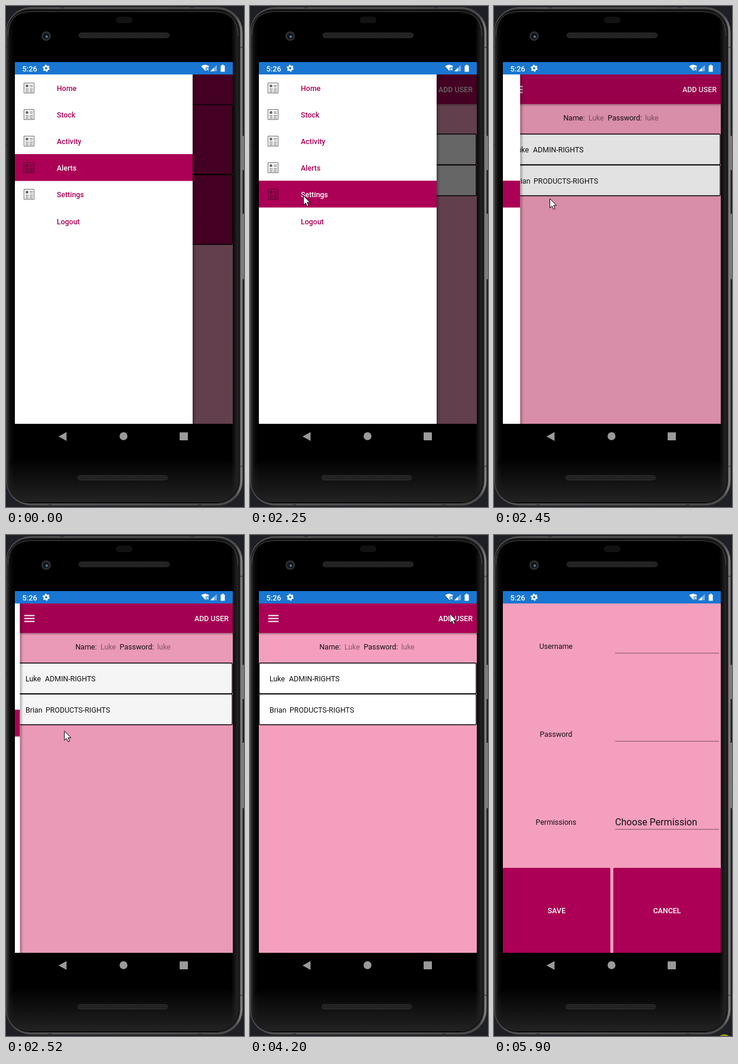
An HTML page for the animation above (5970 ms loop, 403x849 px).

```html
<!DOCTYPE html>
<html lang="en">
<head>
<meta charset="utf-8">
<title>Phone app walkthrough</title>
<style>
  html, body { margin: 0; width: 100%; height: 100%; overflow: hidden; background: #1f2026; }
  svg { display: block; }
  text { font: 12.45px Roboto, sans-serif; white-space: pre; }
  .bold { font-weight: 500; }
  .mid { text-anchor: middle; }
  .end { text-anchor: end; }
</style>
</head>
<body>
<svg id="stage" width="403" height="849" viewBox="0 0 403 849">
  <defs>
    <linearGradient id="metal">
      <stop offset="0" stop-color="#4a4a4a"/><stop offset=".2" stop-color="#555"/>
      <stop offset=".97" stop-color="#4a4a4a"/><stop offset="1" stop-color="#858585"/>
    </linearGradient>
    <linearGradient id="side">
      <stop offset="0" stop-color="#303030"/><stop offset=".012" stop-color="#0c0c0c"/>
      <stop offset=".03" stop-color="#000"/><stop offset=".97" stop-color="#000"/>
      <stop offset="1" stop-color="#262626"/>
    </linearGradient>
    <linearGradient id="foot" x2="0" y2="1">
      <stop offset="0" stop-color="#222" stop-opacity="0"/><stop offset="1" stop-color="#222"/>
    </linearGradient>
    <linearGradient id="down" x2="0" y2="1">
      <stop offset="0" stop-opacity=".3"/><stop offset="1" stop-opacity="0"/>
    </linearGradient>
    <linearGradient id="right">
      <stop offset="0" stop-opacity=".3"/><stop offset="1" stop-opacity="0"/>
    </linearGradient>
    <pattern id="mesh" width="3" height="3" patternUnits="userSpaceOnUse">
      <rect width="3" height="3" fill="#1b1b1b"/><path d="M0 2L2 0" stroke="#3c3c3c"/>
    </pattern>
    <clipPath id="view"><rect x="15" y="116" width="369" height="592"/></clipPath>
    <clipPath id="bar"><rect x="15" y="116" width="369" height="50"/></clipPath>
  </defs>

  <!-- phone body -->
  <rect width="403" height="849" fill="#1f2026"/>
  <g fill="#777">
    <rect x="399" y="220" width="4" height="58"/>
    <rect x="399" y="352" width="4" height="111"/>
  </g>
  <rect x="0" y="2" width="400.500" height="844.500" rx="42" fill="url(#metal)"/>
  <path d="M0 70h4M0 235h4M397 70h4M397 780h4M92 3h6M312 3h6M72 845h6M325 845h6" stroke="#222"/>
  <rect x="1.500" y="5" width="395" height="838" rx="39" fill="#181818"/>
  <rect x="2" y="8" width="391" height="834" rx="37" fill="url(#side)"/>
  <path d="M3 50Q4 9.500 42 9.500H352Q392 9.500 393 50" fill="none" stroke="#555"/>
  <rect x="3" y="765" width="389" height="76" rx="34" fill="url(#foot)"/>
  <rect x="186" y="18" width="28" height="11" rx="5.500" fill="#121212"/>
  <rect x="123.500" y="45.500" width="153" height="8.500" rx="4" fill="url(#mesh)" stroke="#2c2c2c"/>
  <rect x="121.500" y="795.500" width="152" height="8" rx="4" fill="url(#mesh)" stroke="#2c2c2c"/>
  <circle cx="68" cy="51" r="8" fill="#303030"/>
  <circle cx="68" cy="51" r="5.500" fill="#14181d"/>
  <circle cx="69" cy="52" r="2" fill="#4d7fa8"/>
  <rect x="15" y="95" width="369" height="613"/>
  <g fill="#9a9a9a">
    <path d="M89 729.500L102.500 722V737Z"/>
    <circle cx="199" cy="729" r="6.700"/>
    <rect x="294" y="722.500" width="14" height="13.500" rx="1"/>
  </g>

  <!-- status bar -->
  <rect x="15" y="95" width="369" height="21" fill="#1976d2"/>
  <g fill="#fff">
    <text x="27.500" y="110.500" class="bold" style="font-size:12.800px">5:26</text>
    <circle cx="68" cy="105.500" r="3.200" fill="none" stroke="#fff" stroke-width="2.600"/>
    <circle cx="68" cy="105.500" r="4.900" fill="none" stroke="#fff" stroke-width="2" stroke-dasharray="2.600 2.530"/>
    <path d="M330.500 102Q337 97 344 102L337.500 110Z"/>
    <path d="M338 104h6v6h-6z" fill="#1976d2"/>
    <path d="M339 105l4 4m0-4l-4 4" stroke="#fff" stroke-width="1.300"/>
    <path d="M346 110.500L357 100V110.500Z" opacity=".45"/>
    <path d="M346 110.500L352 104.800V110.500Z"/>
    <path d="M363.500 101h2v-1.500h3V101h2v10.500h-7z"/>
  </g>

  <g clip-path="url(#view)">
    <g id="home"></g>
    <g id="users"></g>
    <rect id="scrim" x="15" y="116" width="369" height="592"/>
    <g id="drawer"></g>
    <g id="form"></g>
  </g>
  <circle id="click" r="12" fill="#ffee00" opacity=".55"/>
  <path id="cursor" d="M.5 .5V16.200L4.200 12.800L6.700 18.500L9.200 17.400L6.800 11.900H11.600Z" fill="#fff" stroke="#000"/>
</svg>
<script>
const LOOP = 5970, WINE = "#ab0055", PINK = "#f49fbe";
const el = id => document.getElementById(id);
const rect = (x, y, w, h, fill, more = "") =>
  `<rect x="${x}" y="${y}" width="${w}" height="${h}" fill="${fill}" ${more}/>`;
const text = (x, y, s, fill = "#111", cls = "", more = "") =>
  `<text x="${x}" y="${y}" fill="${fill}" class="${cls}" ${more}>${s}</text>`;
const page = rect(15, 116, 369, 592, PINK);
const toolbar = rect(15, 116, 369, 50, WINE) + rect(15, 166, 369, 4, "url(#down)");
const edge = 'rx="2" stroke="#000" stroke-width="1.3"';

el("home").innerHTML = page + toolbar +
  [167, 286].map(y => rect(15.5, y, 368, 118, WINE, edge)).join("");

el("users").innerHTML = page + toolbar +
  [136.5, 141.5, 146.5].map(y => rect(31, y - 1, 17.5, 2, "#fff")).join("") +
  text(377, 146, "ADD USER", "#fff", "bold end") +
  '<g clip-path="url(#bar)"><circle id="ripple" cx="347" cy="141" fill="#fff"/></g>' +
  text(117.5, 193.5, "Name:") + text(160, 193.5, "Luke", "#895a6b") +
  text(192.5, 193.5, "Password:") + text(256, 193.5, "luke", "#895a6b") +
  [["Luke", 66, "ADMIN-RIGHTS"], ["Brian", 67, "PRODUCTS-RIGHTS"]].map(([name, x, rights], i) => {
    const y = 217 + i * 52.7;
    return rect(15.5, y, 367.5, 51.8, "#fff", edge) + text(33, y + 31, name) + text(x, y + 31, rights);
  }).join("");

const icon = y => `<g transform="translate(30 ${y})" fill="none" stroke="#111" opacity=".62">
  <path d="M.5 .5h17v17h-17zM10 4.500h5.500M10 7h5.500M3 10.500h5.500M10 10.500h5.500M3 13h5.500M10 13h5.500M3 15.300h5.500M10 15.300h5.500"/>
  <circle cx="5.500" cy="5.500" r="2" fill="#111"/></g>`;
const rowTop = i => Math.round(116 + i * 45.1);
const labels = ["Home", "Stock", "Activity", "Alerts", "Settings", "Logout"];
el("drawer").innerHTML = rect(316, 116, 6, 592, "url(#right)") + rect(15, 116, 301, 592, "#fff") +
  rect(15, 0, 301, 45.5, WINE, 'id="mark"') +
  labels.map((s, i) => (i < 5 ? icon(rowTop(i) + 14) : "") +
    text(86, rowTop(i) + 27.5, s, WINE, "bold", `id="item${i}"`)).join("");

el("form").innerHTML = page +
  ["Username", "Password", "Permissions"].map((s, i) => {
    const y = 192.5 + i * 149.3;
    return text(105, y, s, "#111", "mid") + rect(205, y + 7.2, 176, 1, "#7b5262");
  }).join("") +
  text(205, 492, "Choose Permission", "#111", "", 'style="font-size:16.1px"') +
  [[15, "SAVE"], [202, "CANCEL"]].map(([x, s]) =>
    rect(x, 564, 182, 146, WINE, 'rx="2"') + text(x + 91, 641, s, "#fff", "bold mid")).join("");

// pointer strokes: [ms, x, y]; the pointer is hidden outside each stroke
const strokes = [
  [[180, 375, 836], [250, 375, 779], [310, 375, 779]],
  [[1640, 246, 404], [1760, 178, 372], [1900, 118, 340], [2060, 90, 321], [2380, 90, 321],
   [2520, 98, 331], [2660, 160, 440], [2800, 258, 609], [3080, 343, 846], [3250, 343, 846]],
  [[3510, 371, 819], [3620, 290, 640], [3740, 228, 440], [3880, 280, 250], [4060, 338, 133],
   [4820, 338, 133], [4960, 346, 220], [5150, 374, 560], [5290, 388, 764], [5500, 391, 815], [5640, 391, 849]]
];
const clicks = [[2120, 2250, 90, 321], [4270, 4400, 338, 133], [5900, LOOP, 390, 858]];

const clamp = v => Math.min(1, Math.max(0, v));
const within = (t, a, b) => t >= a && t < b;
const show = (id, on) => el(id).style.display = on ? "" : "none";
const move = (id, x, y) => el(id).setAttribute("transform", `translate(${x} ${y})`);
const drawerLeft = t => (1 - clamp((t - 2262) / 507)) ** 5;

function drawPointer(t) {
  const path = strokes.find(s => within(t, s[0][0], s[s.length - 1][0]));
  show("cursor", path);
  if (path) {
    const i = path.findIndex(k => k[0] > t);
    const [t0, x0, y0] = path[i - 1], [t1, x1, y1] = path[i];
    const p = (t - t0) / (t1 - t0);
    move("cursor", x0 + (x1 - x0) * p, y0 + (y1 - y0) * p);
  }
  const hit = clicks.find(c => within(t, c[0], c[1]));
  show("click", hit);
  if (hit) move("click", hit[2], hit[3]);
}

function draw(t) {
  const switched = t >= 2250, open = drawerLeft(t), chosen = switched ? 4 : 3;
  show("home", !switched);
  show("users", switched);
  show("drawer", open > 0);
  move("drawer", -301 * (1 - open), 0);
  el("scrim").setAttribute("opacity", .6 * drawerLeft(t - 46));
  el("mark").setAttribute("y", rowTop(chosen));
  labels.forEach((_, i) => el("item" + i).setAttribute("fill", i === chosen ? "#fff" : WINE));

  const r = clamp((t - 4300) / 250);
  el("ripple").setAttribute("r", 20 * r);
  el("ripple").setAttribute("opacity", .15 * (1 - clamp((t - 4500) / 300)));

  show("form", t >= 4504);
  move("form", 0, 592 * (1 - clamp((t - 4504) / 300)) ** 2);
  drawPointer(t);
}

const start = performance.now();
function tick() {
  draw((performance.now() - start) % LOOP);
  requestAnimationFrame(tick);
}
tick();
</script>
</body>
</html>
```
